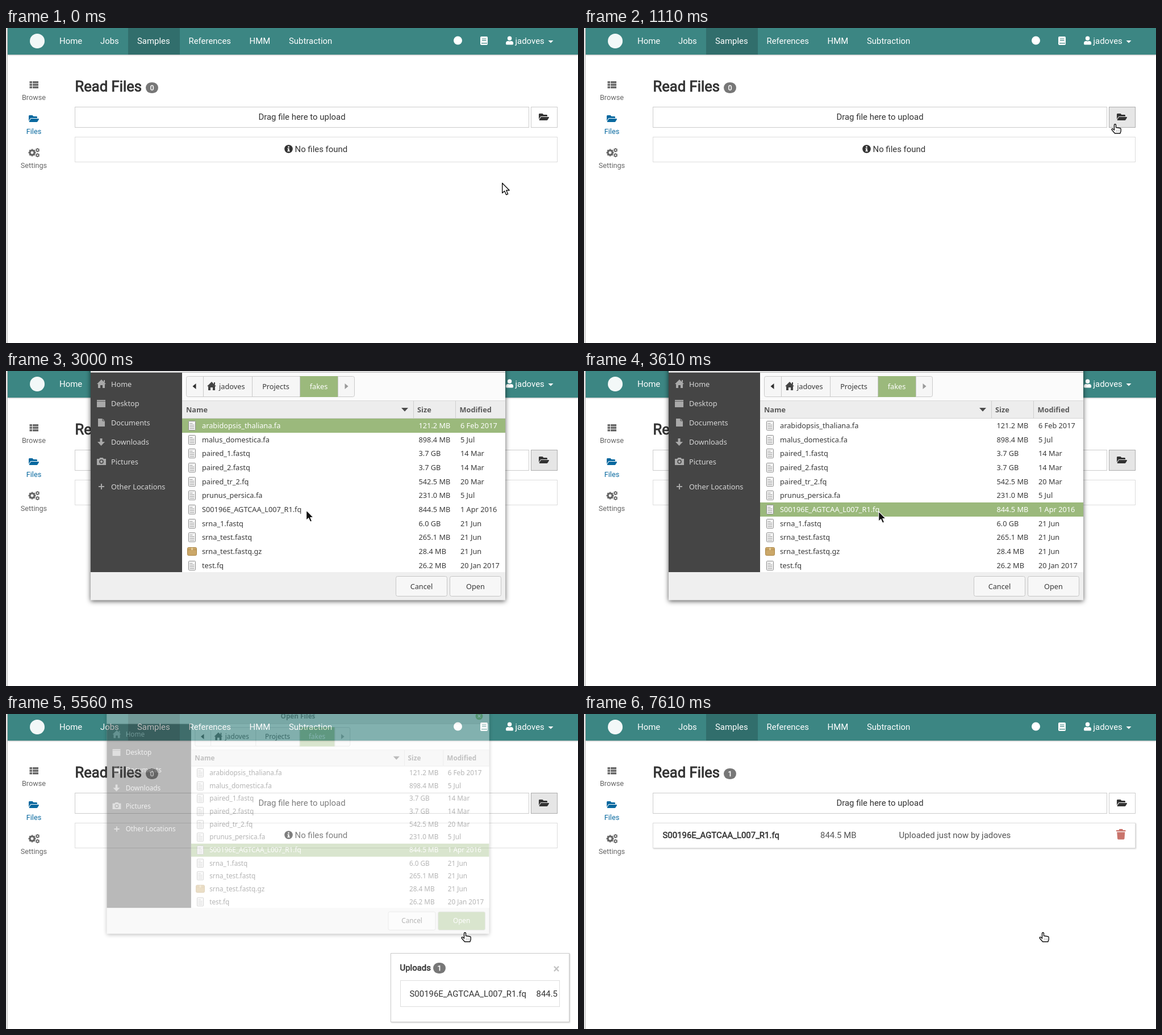
An HTML page that plays this animation: 1007x556 px, repeating every 8.45 s.

```html
<!DOCTYPE html>
<html lang="en">
<head>
<meta charset="utf-8">
<title>Upload read files</title>
<style>
  html, body { margin: 0; width: 100%; height: 100%; overflow: hidden; background: #fff; }
  svg { display: block; width: 100vw; height: 100vh; }
  text { font: 14.93px Roboto, sans-serif; fill: #333; white-space: pre; }
  .mid { text-anchor: middle; }
  .nav text { fill: #fff; }
  .side text { font-size: 12.7px; fill: #666; }
  .heavy { stroke: #333; stroke-width: .55px; }
  .title { font-size: 25.6px; stroke-width: .9px; }
  .badge { font-size: 12.8px; fill: #fff; stroke: #fff; stroke-width: .4px; }
  .dialog text { font: 12.75px "Noto Sans", "Open Sans", sans-serif; fill: #3a3a3a; }
  .dialog .head { font-weight: 600; fill: #5a5a5a; }
  .dialog .place { fill: #d6d6d6; }
  .dialog .lit { fill: #fff; }
  .shadow { filter: drop-shadow(0 2px 4px rgba(0,0,0,.65)); }
  .soft { filter: drop-shadow(1px 1px 1px rgba(0,0,0,.2)); }
</style>
</head>
<body>
<svg id="stage" viewBox="0 0 1007 556" xmlns="http://www.w3.org/2000/svg"></svg>
<script>
const LOOP = 8450;
const USER = 'jadoves';
const FILE = 'S00196E_AGTCAA_L007_R1.fq';
const GREEN = '#9bb97c';

const text = (x, y, s, cls = '', more = '') =>
  `<text x="${x}" y="${y}" class="${cls}" ${more}>${s}</text>`;
const rect = (x, y, w, h, fill, more = '') =>
  `<rect x="${x}" y="${y}" width="${w}" height="${h}" fill="${fill}" ${more}/>`;
const box = (x, y, w, h, fill, line, more = '') =>
  rect(x + .5, y + .5, w - 1, h - 1, fill, `stroke="${line}" ${more}`);
const path = (d, fill, more = '') => `<path d="${d}" fill="${fill}" ${more}/>`;
const circle = (x, y, r, fill, more = '') =>
  `<circle cx="${x}" cy="${y}" r="${r}" fill="${fill}" ${more}/>`;
const at = (x, y, s, scale = 1) => `<g transform="translate(${x} ${y}) scale(${scale})">${s}</g>`;
const group = (id, s, cls = '') => `<g id="${id}" class="${cls}">${s}</g>`;

const folder = (x, y, fill) => at(x, y, path(
  'M573 292L500 416A64 64 0 0 1 445 448H45c-18 0-30-20-21-36l73-124A64 64 0 0 1 152 256h400c18 0 30 20 21 36z' +
  'M152 224h328v-48c0-26-21-48-48-48H272l-64-64H48C21 64 0 85 0 112v278l69-118C86 242 118 224 152 224z', fill), .03125);

const house = (x, y, fill) => at(x, y, path('M8 0L16 8H14V15H10V10H6V15H2V8H0L8 0zM12 1h2v4h-2z', fill));

function gear(x, y, r, teeth) {
  let s = circle(x, y, r * .62, 'none', `stroke="#666" stroke-width="${r * .48}"`);
  for (let i = 0; i < teeth; i++)
    s += rect(x - r * .19, y - r, r * .38, r * .35, '#666', `transform="rotate(${i * 360 / teeth} ${x} ${y})"`);
  return s;
}

const badge = (x, y, s, id = '') =>
  rect(x, y, 22, 19, '#777', 'rx="9.5"') + text(x + 11, y + 14, s, 'badge mid', id && `id="${id}"`);

function navBar() {
  const links = [[94, 'Home'], [166, 'Jobs'], [231, 'Samples'], [321.5, 'References'], [428.5, 'HMM'], [498, 'Subtraction']];
  return rect(3, 0, 1004, 47, '#3c8683', 'style="filter:drop-shadow(0 1px 1px rgba(0,0,0,.25))"') +
    rect(215, 0, 91, 47, '#316e6c') +
    circle(55, 23, 13, '#f3f8f8') +
    links.map(([x, s]) => text(x, 28, s)).join('') +
    circle(795.5, 22, 7.5, '#fff') +
    rect(835, 15, 13, 15, '#fff', 'rx="2"') +
    path('M838 19h7.5M838 21.8h7.5M837 26.8h10', 'none', 'stroke="#3c8683" stroke-width="1.2"') +
    at(880, 14.5, path('M224 256a128 128 0 1 0 0-256 128 128 0 0 0 0 256zm90 32h-17a174 174 0 0 1-146 0h-17A134 134 0 0 0 0 422v42a48 48 0 0 0 48 48h352a48 48 0 0 0 48-48v-42a134 134 0 0 0-134-134z', '#fff'), .0293) +
    text(896.5, 28, USER) +
    path('M954.5 22h9l-4.500 4.500z', '#fff');
}

function sideBar() {
  let list = '';
  for (const y of [94, 98.5, 103]) list += rect(41.500, y, 4.500, 3.500, '#666') + rect(47, y, 10, 3.500, '#666');
  return list + text(49, 127, 'Browse', 'mid') +
    folder(40, 152, '#07689f') + text(49, 187, 'Files', 'mid', 'style="fill:#07689f"') +
    gear(46, 220, 6.5, 8) + gear(55.500, 215.500, 3.600, 6) + gear(55.500, 224.500, 3.600, 6) +
    text(49, 247, 'Settings', 'mid');
}

function content() {
  const empty = box(121, 192, 850, 45, '#fff', '#ddd') +
    circle(497.5, 213.5, 7.3, '#333') +
    path('M496.300 208.800h2.400v2.200h-2.400zM495.500 212.200h3.200v4.300h1v1.500h-4.300v-1.500h1v-2.800h-.9z', '#fff') +
    text(508.5, 219, 'No files found');
  const row = box(121, 192, 850, 45, '#fff', '#ddd', 'class="soft"') +
    text(138.5, 219, FILE, 'heavy') +
    text(416, 219, '', '', 'id="size" style="fill:#555"') +
    text(554.5, 219, `Uploaded just now by ${USER}`, '', 'style="fill:#555"') +
    path('M937 205h4.500l1-2h5.500l1 2h4.500v2.300H937zM938.300 208.500h14l-.8 11.300q-.1 1.700-1.600 1.700h-9.200q-1.500 0-1.600-1.700z', '#c9746c');
  return text(121.5, 112, 'Read Files', 'heavy title') + badge(246, 96, '0', 'count') +
    box(121, 139, 800, 37, '#fff', '#ccc') + text(521, 162, 'Drag file here to upload', 'mid') +
    box(924, 139, 47, 37, '#fff', '#ccc', 'id="browse"') + folder(938, 149, '#333') +
    group('empty', empty) + group('row', row);
}

const ROW = 24.63;
const files = [
  ['arabidopsis_thaliana.fa', '121.2 MB', '6 Feb 2017'],
  ['malus_domestica.fa', '898.4 MB', '5 Jul'],
  ['paired_1.fastq', '3.7 GB', '14 Mar'],
  ['paired_2.fastq', '3.7 GB', '14 Mar'],
  ['paired_tr_2.fq', '542.5 MB', '20 Mar'],
  ['prunus_persica.fa', '231.0 MB', '5 Jul'],
  [FILE, '844.5 MB', '1 Apr 2016'],
  ['srna_1.fastq', '6.0 GB', '21 Jun'],
  ['srna_test.fastq', '265.1 MB', '21 Jun'],
  ['srna_test.fastq.gz', '28.4 MB', '21 Jun'],
  ['test.fq', '26.2 MB', '20 Jan 2017']
];

const sheet = y => box(321, y, 13, 17, '#f4f4f4', '#8c8c8c', 'rx="1"') +
  path(`M323.500 ${y + 4.500}h5M323.500 ${y + 7.500}h8M323.500 ${y + 10.500}h8M323.500 ${y + 13.500}h8`, 'none', 'stroke="#999"');
const parcel = y => box(319, y, 17, 15, '#cba768', '#a98545', 'rx="2"') +
  rect(320, y + 4, 15, 1, '#b38f50') + rect(326, y + 1, 3, 4, '#e4cb98');

function fileRow([name, size, date], i) {
  const y = Math.round(101.2 + i * ROW);
  return (name.endsWith('.gz') ? parcel(y - 12) : sheet(y - 13)) +
    `<g class="file">${text(345, y, name)}${text(726.5, y, size)}${text(800, y, date)}</g>`;
}

function places() {
  const grey = '#a9a9a9';
  const names = [[27.5, 'Home'], [62, 'Desktop'], [96, 'Documents'], [130, 'Downloads'], [164.5, 'Pictures'], [208.5, 'Other Locations']];
  return rect(149, 3, 161, 352, '#454545') +
    house(160, 15, grey) +
    path('M160 51h15v13h-15z', grey) + rect(160, 53, 15, 1, '#666') +
    path('M162 84h8l4 4v10h-12z', grey) + path('M170 84v4h4', 'none', 'stroke="#454545"') +
    path('M165.500 119h4v6h4.500l-6.500 7-6.500-7h4.500z', grey) +
    path('M160 155h4l1.500-2h5l1.500 2h4v11h-16z', grey) + circle(168, 160, 3, 'none', 'stroke="#454545" stroke-width="1.5"') +
    path('M167 199h2v4h4v2h-4v4h-2v-4h-4v-2h4z', grey) +
    names.map(([y, s]) => text(185, y, s, 'place')).join('');
}

function dialog() {
  const crumbs = box(317, 9, 297, 37, '#f6f6f6', '#c9c9c9', 'rx="3"') +
    rect(517, 9, 67, 37, GREEN) +
    [347, 433, 517, 584].map(x => rect(x, 10, 1, 35, '#c9c9c9')).join('') +
    path('M334.500 22v10l-6-5z', '#2f2f2f') + path('M596.500 22v10l6-5z', '#999') +
    house(354, 19, '#444') + text(375, 31.5, USER) +
    text(475, 31.5, 'Projects', 'mid') + text(550.5, 31.5, 'fakes', 'mid lit');
  const head = rect(310, 53, 569, 31, '#ededed') + rect(310, 52, 569, 1, '#d8d8d8') + rect(310, 83, 569, 1, '#d4d4d4') +
    rect(717, 53, 1, 30, '#cfcfcf') + rect(791, 53, 1, 30, '#cfcfcf') +
    text(317, 72.5, 'Name', 'head') + text(724, 72.5, 'Size', 'head') + text(798.5, 72.5, 'Modified', 'head') +
    path('M696 65h12l-6 6.500z', '#4a4a4a');
  const button = (x, w, s, id) => box(x, 362, w, 36, '#f7f7f7', '#c6c6c6', `rx="3" id="${id}"`) +
    text(x + w / 2, 384.500, s, 'mid', `id="${id}Text"`);
  return rect(149, -30, 730, 434.500, '#efefef', 'class="shadow"') +
    rect(149, -30, 730, 32, '#e2e2e2') + text(514, -7, 'Open Files', 'mid head') +
    circle(860, -12, 7, '#7fae55') + path('M857.500 -14.500l5 5m0 -5l-5 5', 'none', 'stroke="#fff" stroke-width="1.4"') +
    rect(149, 2, 730, 1, '#bdbdbd') +
    rect(310, 3, 569, 50, '#fbfbfb') + rect(310, 84, 569, 271, '#fff') +
    places() + crumbs + head +
    rect(310, 84, 569, 25, GREEN, 'id="mark"') +
    files.map(fileRow).join('') +
    button(686, 91, 'Cancel', 'cancel') + button(781, 91, 'Open', 'open');
}

function uploads() {
  return box(677, 422, 315, 122, '#fff', '#ccc', 'class="soft"') +
    text(693.5, 452.5, 'Uploads', 'heavy') + badge(752, 439, '1') +
    path('M965 445.500l8 8.500m0 -8.500l-8 8.500', 'none', 'stroke="#c2c2c2" stroke-width="2.4"') +
    box(694, 470, 281, 47, '#fff', '#ddd') +
    rect(695, 470, 0, 5, '#55a08f', 'id="bar"') +
    text(710.5, 499, FILE) + text(933.500, 499, '844.5');
}

const ARROW = 'M.7 .8V18.300L4.700 14.700 7.600 21.300 10.600 20 7.800 13.500H13.200z';
const HAND = 'M5.500 9.500V2.300a1.500 1.500 0 0 1 3 0V6.500l7.300 1.300q1.400 .3 1.400 1.700v3.500l-1.300 4H6.600L1.400 11q-.9-1.600 .5-2.200 1.500-.4 3.600 2.400z';
const cursors = {
  light: path(ARROW, '#fff', 'stroke="#111" stroke-width="1.4" stroke-linejoin="round"'),
  dark: path(ARROW, '#111', 'stroke="#fff" stroke-width="1.1" stroke-linejoin="round"'),
  hand: path(HAND, '#fff', 'stroke="#111" stroke-width="1.4" stroke-linejoin="round"') +
    path('M9.500 11v3.500M12 11v3.500M14.500 11v3.500', 'none', 'stroke="#999" stroke-width=".7"')
};

document.getElementById('stage').innerHTML =
  rect(0, 0, 1007, 556, '#fff') + rect(0, 0, 3, 556, '#e6e6e6') + rect(2, 0, 1, 556, '#c4c4c4') +
  `<g class="nav">${navBar()}</g><g class="side">${sideBar()}</g>` + content() +
  group('dialog', dialog(), 'dialog') + group('uploads', uploads()) +
  Object.entries(cursors).map(([id, s]) => group(id, s)).join('');

const el = id => document.getElementById(id);
const rows = [...document.querySelectorAll('.file')];
const show = (id, on) => el(id).setAttribute('display', on ? 'inline' : 'none');
const fill = (id, color) => { el(id).style.fill = color; };

// Pointer stops: start time, shape, x, y
const stops = [
  [1110, 'hand', 928, 169], [2390, 'hand', 927, 169], [2670, 'dark', 716, 207],
  [3000, 'dark', 528, 245], [3280, 'dark', 518, 247], [4220, 'dark', 617, 280],
  [4560, 'dark', 768, 366], [4890, 'dark', 827, 383], [5560, 'hand', 801, 385]
];

function pointer(t) {
  if (t >= 1110) return stops.filter(s => s[0] <= t).pop().slice(1);
  const step = t < 390 ? 0 : Math.floor((t - 390) / (720 / 13)) + 1;
  const p = step / 14, e = p * p * (3 - 2 * p);
  const x = 873 + 61 * e, y = 273 - 104 * e;
  return y < 175 ? ['hand', x - 6, y] : ['light', x, y];
}

function draw(t) {
  const [shape, x, y] = pointer(t);
  for (const id in cursors) show(id, id === shape);
  el(shape).setAttribute('transform', `translate(${x} ${y})`);

  const closing = t >= 5560, done = t >= 6060;
  const hover = !done && (t >= 1110 || shape === 'hand');
  fill('browse', hover ? '#e6e6e6' : '#fff');
  el('browse').style.stroke = hover ? '#adadad' : '#ccc';

  show('dialog', t >= 2110 && !done);
  el('dialog').setAttribute('opacity', closing ? .37 : 1);
  el('dialog').setAttribute('transform', closing ? 'translate(514 191) scale(.922) translate(-514 -191)' : '');
  const picked = t < 3610 ? 0 : 6;
  el('mark').setAttribute('y', Math.round(84 + picked * ROW));
  rows.forEach((r, i) => { for (const c of r.children) c.setAttribute('class', i === picked ? 'lit' : ''); });
  fill('open', closing ? GREEN : '#f7f7f7');
  fill('openText', closing ? '#fff' : '#3a3a3a');

  show('uploads', closing && t < 7610);
  const ticks = done ? Math.min(3, Math.floor((t - 6060) / 386)) : 0;
  el('bar').setAttribute('width', done ? 22 + ticks * 45 : 0);

  show('empty', !done);
  show('row', done);
  el('count').textContent = done ? '1' : '0';
  el('size').textContent = t < 7610 ? '0.0 B' : '844.5 MB';
}

const start = performance.now();
function frame() {
  draw((performance.now() - start) % LOOP);
  requestAnimationFrame(frame);
}
frame();
</script>
</body>
</html>
```
